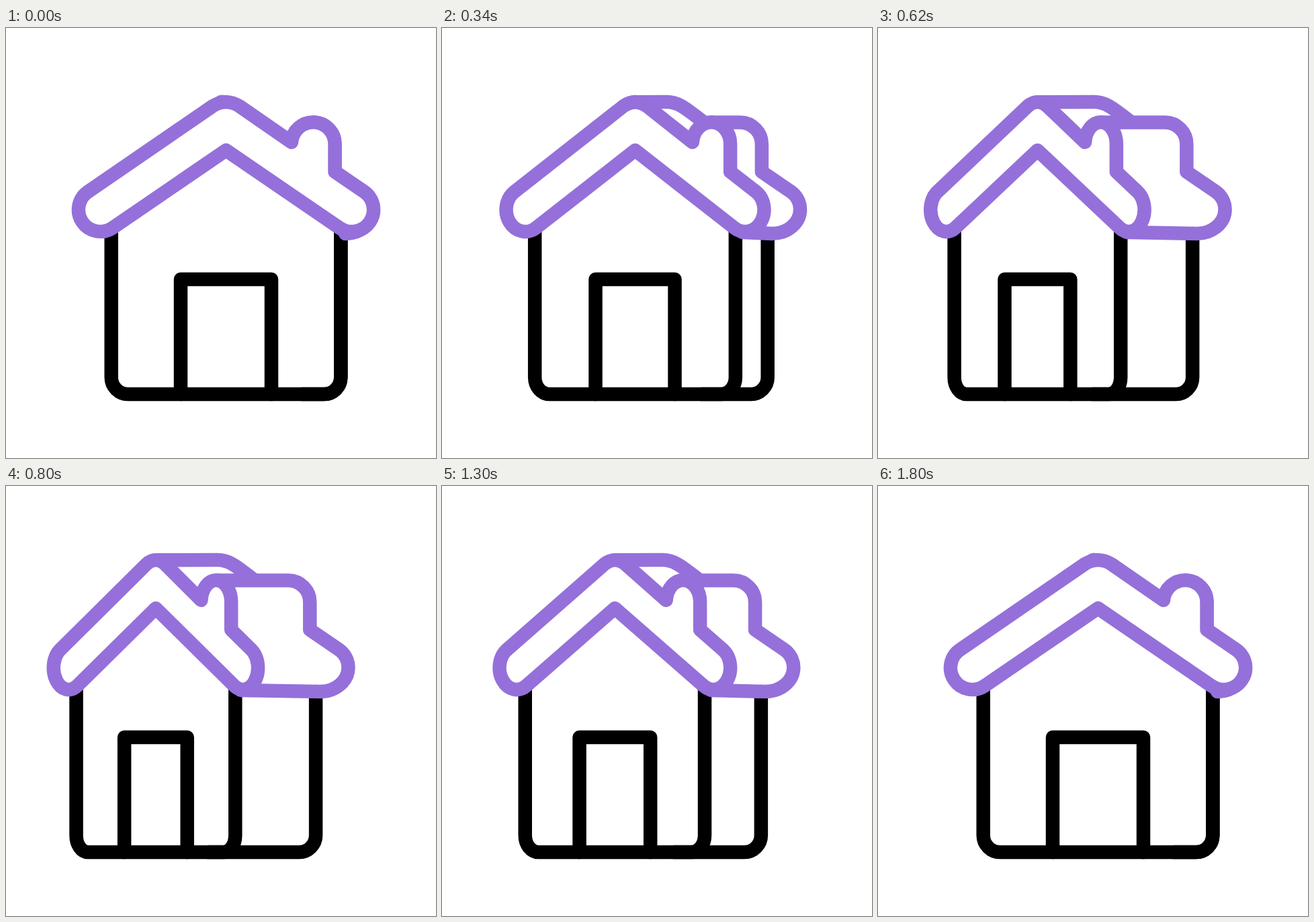
An HTML page for the animation above (1.82 s loop, 640x640 px).

```html
<!DOCTYPE html>
<html lang="en">
<head>
<meta charset="utf-8">
<title>Turning house</title>
<style>
  html, body { margin: 0; width: 100%; height: 100%; overflow: hidden; background: #fff; }
  svg { display: block; width: 100%; height: 100%; }
  path {
    fill: none; stroke: #000; stroke-width: 20.5;
    stroke-linejoin: round; stroke-linecap: round;
    vector-effect: non-scaling-stroke;
  }
  .roof { stroke: #9570da; }
  #frontRoof { fill: #fff; }
</style>
</head>
<body>
<svg viewBox="0 0 640 640">
  <path id="sideWall"/>
  <g class="front">
    <path d="M156.7 302V520A25 25 0 0 0 181.7 545H473.3A25 25 0 0 0 498.3 520V302"/>
    <path d="M260 545V374H395V545"/>
  </g>
  <path id="sideRoof" class="roof"/>
  <g class="front">
    <path id="frontRoof" class="roof" d="M122 243.7L308 116Q327.5 104.5 347 116L425 170
      A32.3 32.3 0 0 1 489.5 173V214L533 243.7A32.5 32.5 0 0 1 496 297.3
      L327.5 182L159 297.3A32.5 32.5 0 0 1 122 243.7Z"/>
  </g>
</svg>
<script>
const LOOP = 1820, TURN = 1800, SHIFT = 38.5, SQUEEZE = 0.307, PIVOT = 108;
const sideWall = document.getElementById('sideWall');
const sideRoof = document.getElementById('sideRoof');
const fronts = document.querySelectorAll('.front');

// Eased rise over `time` ms, held at 1 beyond it
const ease = (t, time) => {
  const x = Math.min(t / time, 1);
  return x * x * (3 - 2 * x);
};

function draw(now) {
  const t = Math.min(now % LOOP, TURN);
  const away = Math.min(t, TURN - t);     // time from the nearest rest pose
  const shift = SHIFT * ease(away, 900);
  const turn = ease(away, 776);           // narrowing ends before the shift does
  const scale = 1 - SQUEEZE * turn;

  const front = x => PIVOT + (x - PIVOT) * scale - shift;
  const back = x => x - shift - 5 * turn * (1 - turn);
  const tuck = 32 * (1 - turn) ** 4;      // keeps the far ridge hidden at rest
  const ridge = x => back(x) - tuck;

  for (const g of fronts)
    g.setAttribute('transform', `matrix(${scale} 0 0 1 ${front(0)} 0)`);

  sideWall.setAttribute('d',
    `M${front(440)} 545H${back(473.3)}A25 25 0 0 0 ${back(498.3)} 520V306`);

  sideRoof.setAttribute('d',
    `M${front(327.5)} 110.3L${ridge(352)} 110
     C${ridge(372)} 110 ${ridge(385)} 124 ${ridge(407)} 140
     M${front(457.5)} 140.5H${back(457.5)}
     A32.3 32.3 0 0 1 ${back(489.5)} 173V214L${back(532)} 243
     C${back(541)} 249 ${back(546.7)} 259 ${back(546.7)} 270
     C${back(546.7)} 290 ${back(528)} 306 ${back(505)} 306
     L${front(510)} 304`);

  requestAnimationFrame(draw);
}
draw(0);
</script>
</body>
</html>
```
